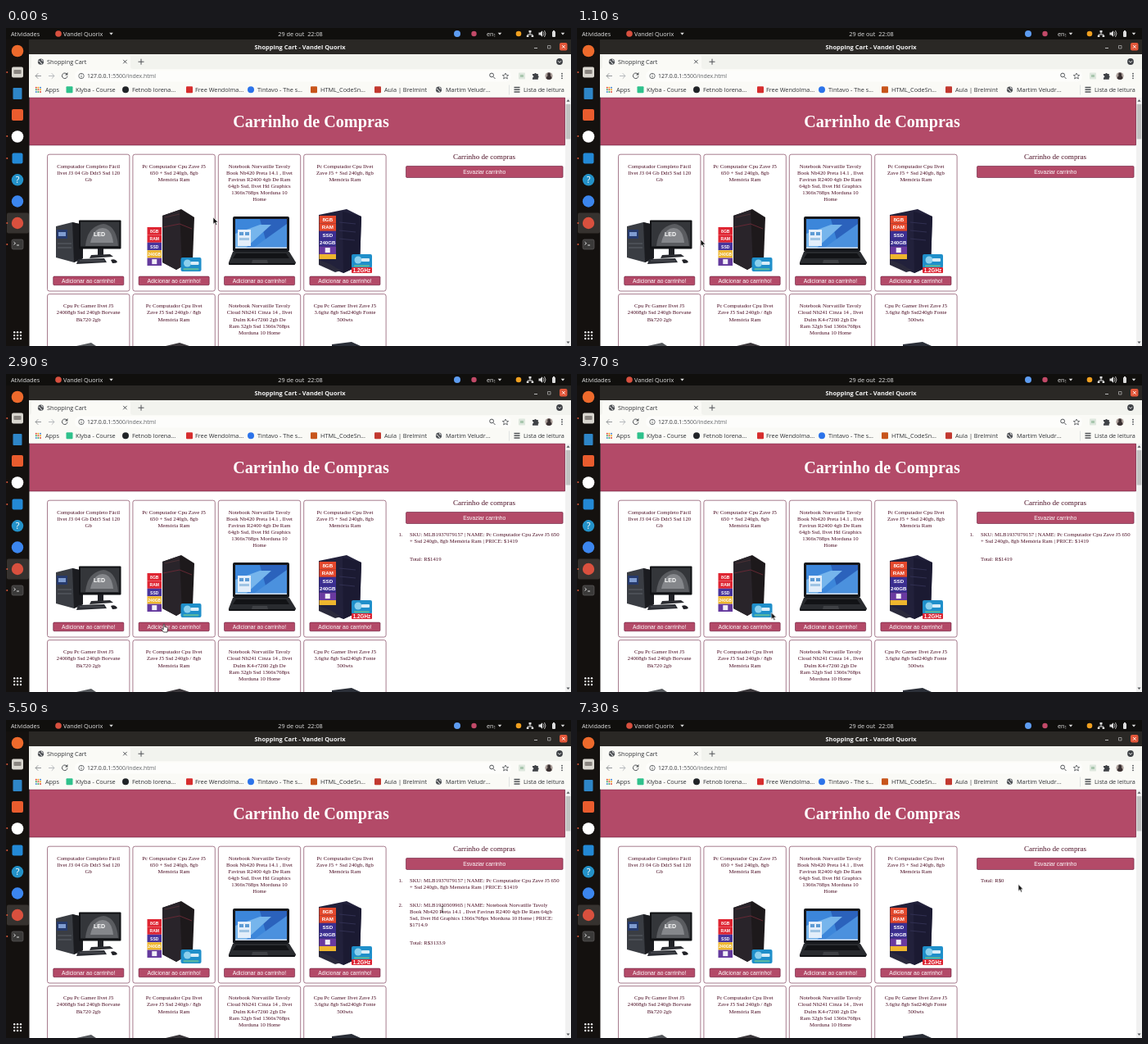
An HTML page that plays this animation: 690 px wide and 388 px high, repeating every 8000 ms.

```html
<!DOCTYPE html>
<html lang="pt-BR">
<head>
<meta charset="utf-8">
<title>Shopping Cart</title>
<style>
html, body { margin: 0; width: 100%; height: 100%; overflow: hidden; background: #fff; }
svg { display: block; width: 100vw; height: 100vh; }
text { white-space: pre; }
.ui { font: 7.3px "Open Sans", "Noto Sans", sans-serif; fill: #303236; }
.serif { font: 6.73px "Liberation Serif", serif; fill: #4a0c22; }
.button { font: 6.73px "Liberation Sans", sans-serif; fill: #fff; }
.heading { font: bold 20.2px "Liberation Serif", serif; fill: #fff; }
.badge { font: bold 5.4px "Liberation Sans", sans-serif; fill: #fff; }
.line { fill: none; }

.timed { opacity: 0; animation: 8s step-end infinite; }
.first { animation-name: first; }
.both { animation-name: both; }
.second { animation-name: second; }
.empty { animation-name: empty; }
.arrow { animation-name: arrow; }
.hand { animation-name: hand; }
.beam { animation-name: beam; }
#pointer { animation: move 8s linear infinite; }

@keyframes first { 36.25% { opacity: 1 } 58.75% { opacity: 0 } }
@keyframes both { 58.75% { opacity: 1 } 80% { opacity: 0 } }
@keyframes second { 80% { opacity: 1 } 91.25% { opacity: 0 } }
@keyframes empty { 91.25%, 100% { opacity: 1 } }
@keyframes arrow {
  0%, 40%, 60%, 91.25%, 100% { opacity: 1 }
  31.25%, 53.75%, 66.25% { opacity: 0 }
}
@keyframes hand { 31.25%, 53.75% { opacity: 1 } 40%, 60% { opacity: 0 } }
@keyframes beam { 66.25% { opacity: 1 } 91.25% { opacity: 0 } }
@keyframes move {
  0% { transform: translate(253px, 231px); animation-timing-function: steps(11) }
  13.75% { transform: translate(151px, 258px); animation-timing-function: steps(7) }
  22.5%, 28.75% { transform: translate(172px, 280px); animation-timing-function: steps(3) }
  32.5%, 37.5% { transform: translate(193px, 305px); animation-timing-function: steps(9) }
  48.75% { transform: translate(250px, 287px); animation-timing-function: steps(5) }
  55%, 58.75% { transform: translate(284.5px, 309px); animation-timing-function: steps(6) }
  66.25%, 67.5% { transform: translate(526px, 238px); animation-timing-function: steps(1) }
  68.75% { transform: translate(533px, 231px); animation-timing-function: steps(2) }
  71.25%, 72.5% { transform: translate(540px, 226px); animation-timing-function: steps(3) }
  76.25%, 100% { transform: translate(539px, 200.5px) }
}
</style>
</head>
<body>
<script>
const PINK = '#b34a68', WINE = '#5f0f30', GRAY = '#505357', PALE = '#ddd';

const rect = (x, y, w, h, fill, r = 0, more = '') =>
  `<rect x="${x}" y="${y}" width="${w}" height="${h}" rx="${r}" fill="${fill}" ${more}/>`;
const bordered = (x, y, w, h, fill, r = 0) => rect(x, y, w, h, fill, r, `stroke="${WINE}" stroke-width=".55"`);
const circle = (x, y, r, fill) => `<circle cx="${x}" cy="${y}" r="${r}" fill="${fill}"/>`;
const shape = (d, fill) => `<path d="${d}" fill="${fill}"/>`;
const line = (d, color = GRAY, width = 1) =>
  `<path class="line" d="${d}" stroke="${color}" stroke-width="${width}"/>`;
const text = (cls, x, y, str, style = '') => `<text class="${cls}" x="${x}" y="${y}" style="${style}">${str}</text>`;
const centered = (cls, x, y, str, style = '') => text(cls, x, y, str, 'text-anchor:middle;' + style);
const caret = (x, y) => shape(`M${x - 2.3} ${y - 1.3}h4.6l-2.3 2.8z`, PALE);
const globe = (x, y) => circle(x, y, 3.6, GRAY) +
  line(`M${x - 3} ${y - 1}q2 0 2.5 1.5t2 2M${x + 1} ${y - 3}q-.5 2 2 2`, '#fff', .9);
const grid = (x, y, gap, r, color) => Array.from({ length: 9 }, (_, i) =>
  circle(x + (i % 3) * gap, y + Math.floor(i / 3) * gap, r, color(i))).join('');

function topBar() {
  const pale = 'fill:#e2e2e2';
  return rect(0, 0, 690, 14, '#100f0d') +
    text('ui', 6, 9.6, 'Atividades', pale) +
    circle(64, 7, 3.8, '#d8503f') +
    text('ui', 70, 9.6, 'Vandel Quorix', pale) + caret(128.5, 7) +
    centered('ui', 359.5, 9.6, '29 de out  22:08', pale) +
    circle(551, 7, 4, '#5d9cf0') + circle(571.5, 7, 3.2, '#c24a68') +
    text('ui', 587, 9.6, 'en<tspan font-size="4.5" dy="1">1</tspan>', pale) + caret(603, 7) +
    circle(626, 7, 3.3, '#f0a020') +
    line('M640 5v3M637 10V8h6v2', PALE) + rect(638.5, 3, 3, 2.5, PALE) +
    rect(635.8, 9, 2.6, 2, PALE) + rect(641.6, 9, 2.6, 2, PALE) +
    shape('M650.5 5.5h2l2.5-2.3v7.6l-2.5-2.3h-2z', PALE) + line('M656 4.5q2 2.5 0 5M657.5 3q3 4 0 8', PALE, .8) +
    rect(667, 4, 4, 7, PALE, 1) + rect(668, 3, 2, 1, PALE) + caret(680, 7);
}

function windowBar() {
  return rect(28, 14, 662, 18.5, '#2a2825') +
    centered('ui', 359, 25.6, 'Shopping Cart - Vandel Quorix', 'font-weight:bold;font-size:7.45px;fill:#f4f4f4') +
    line('M645 24.5h4', '#bbb') + line('M661.5 21.5h3.5v3.500h-3.5z', '#bbb', .7) +
    rect(676, 18, 9.5, 9.5, '#e2573a', 2) + line('M679 21l3.6 3.6M682.6 21l-3.6 3.6', '#fff', .9);
}

function browserBars() {
  const bookmarks = [
    [73.5, 85, '#2fc18c', 'Klyba - Course', true], [142, 154, '#202327', 'Fetnob lorena...'],
    [220, 231, '#d62d2d', 'Free Wendolma...', true], [295, 307, '#2b73ea', 'Tintavo - The s...'],
    [372, 384, '#c8551b', 'HTML_CodeSn...', true], [450, 462, '#c2382f', 'Aula | Brelmint', true],
  ];
  const colors = ['#e24a3b', '#f2a51d', '#4285d8', '#3ba55c'];
  return rect(28, 32, 662, 18, '#f2f3ee') +
    shape('M28 50q3 0 3-3v-11q0-3 3-3h115q3 0 3 3v11q0 3 3 3z', '#fafaf6') +
    globe(42.5, 41.2) + text('ui', 50, 43.8, 'Shopping Cart') +
    line('M143.2 38.9l4.4 4.4M147.6 38.9l-4.4 4.4') + line('M161.5 41.2h7M165 37.7v7') +
    circle(676, 41, 3.9, '#3f4246') + line('M674 40.2l2 2 2-2', '#fff', .9) +
    rect(28, 50, 662, 34.5, '#fafaf6') + rect(84, 51.8, 533, 13.6, '#fdfdfb', 6.8) +
    line('M43 58.5h-7m3.2-3.2l-3.2 3.2 3.2 3.2', '#96999c') + line('M52 58.5h7m-3.2-3.2l3.2 3.2-3.2 3.2', '#b6b9bd') +
    line('M74.5 56.5a3.3 3.3 0 1 0 .5 2.3') + shape('M75.4 54v3.4h-3.4z', GRAY) +
    line('M95.2 58.5a3.2 3.2 0 1 0-6.4 0 3.2 3.2 0 1 0 6.4 0M92 58v2.4M92 56.2v.9', GRAY, .8) +
    text('ui', 99, 61, '127.0.0.1<tspan fill="#5f6266">:5500/index.html</tspan>', 'font-size:6.95px') +
    line('M595.5 57.5a2.4 2.4 0 1 0-4.8 0 2.4 2.4 0 1 0 4.8 0M595 59.5l2.5 2.5') +
    line('M610 55l1.1 2.4 2.6.2-2 1.8.7 2.6-2.4-1.4-2.4 1.4.7-2.6-2-1.8 2.6-.2z', GRAY, .8) +
    rect(626, 54.5, 8, 8, '#dde7dd', 1) + rect(628, 57, 4, 3, '#a9c7ae') +
    shape('M643 56h2.2a1.4 1.4 0 0 1 2.6 0h2v2.2a1.4 1.4 0 0 1 0 2.6v2h-6.8v-2.2a1.3 1.3 0 0 0 0-2.6z', '#3f4246') +
    circle(663, 58.5, 4.6, '#a99d98') + shape('M659.5 61.5q1-3 2-3-1-4 1.5-4t2 4q1 0 1.6 3-3.5 3-7.1 0z', '#3a3031') +
    [55.7, 58.5, 61.3].map(y => circle(679, y, .9, GRAY)).join('') +
    grid(36.8, 72.7, 2.6, 1, i => colors[i % 4]) +
    text('ui', 48, 78, 'Apps') +
    bookmarks.map(([x, tx, color, label, square]) =>
      (square ? rect(x, 71.3, 8, 8, color, 1) : circle(x + 4, 75.3, 4, color)) + text('ui', tx, 78, label)).join('') +
    globe(528.5, 75.2) + text('ui', 537, 78, 'Martim Veludr...') +
    rect(614, 69.5, .7, 12, '#d5d7da') +
    line('M620.5 72.5h7M620.5 75.3h7M620.5 78h7', GRAY, 1.4) +
    text('ui', 632, 78, 'Lista de leitura');
}

function sidebar() {
  const running = [54, 132, 159, 238, 264];
  return rect(0, 14, 28.5, 374, '#14110f') + rect(1, 225.5, 27, 25, '#36322f', 2) +
    running.map(y => circle(1.3, y, 1, '#d8573a')).join('') +
    circle(14, 28, 7.3, '#ee6a2c') +
    rect(7, 47.5, 14, 13, '#d9d6cf', 2) + rect(9.5, 51, 9, 5, '#8a8580', 1) +
    rect(8.5, 73, 11, 14, '#2e86c8', 1) + rect(7, 99, 14, 14, '#e95c2e', 2) +
    circle(14, 132.5, 7.3, '#fff') + rect(7.5, 152.5, 13, 13, '#2389d6', 2) +
    circle(14, 185.3, 7.2, '#2492c9') +
    centered('ui', 14, 189.2, '?', 'font-size:11px;fill:#fff') +
    circle(14, 211.5, 7.2, '#3c86ee') + circle(14, 238, 7.2, '#d9503e') +
    rect(7, 258, 14, 12, '#3b3a39', 2, 'stroke="#666462" stroke-width=".6"') +
    line('M9.5 261l2 1.7-2 1.7M13 265h3', '#eee', .9) +
    grid(10.2, 371.2, 3.9, 1.2, () => '#eee');
}

const sticker = (x, y) => rect(x, y, 25, 17, '#1f8fca', 2) + circle(x + 8, y + 7, 4.5, '#8bd0ee') +
  rect(x + 12, y + 5, 10, 4, '#d9edf8', 1) + rect(x + 3, y + 13, 19, 2.5, '#54b4a4', 1);

function desktopSet() {
  return shape('M61 242l20-5 13 3v41l-11 5-22-6z', '#3a3d43') + shape('M81 237l13 3v41l-11 5z', '#1b1c20') +
    rect(62, 246, 13, 11, '#263a6c') + rect(64, 249, 9, 5, '#7f9cd0') + line('M63 263h17M63 268h17', '#666a72', .8) +
    rect(89, 234.5, 51.5, 35, '#111215', 1) + rect(91, 236.5, 47.5, 30, '#34363a') +
    shape('M97 266q2-24 22-27 16 2 18 27z', '#5a5c60') + shape('M103 262q4-18 15-18t13 18z', '#85878b') +
    centered('badge', 114, 254, 'LED', 'font-size:7px') +
    rect(112, 269, 7, 8, '#202126') + shape('M104 277l23-1 4 3-29 2z', '#2b2c31') +
    shape('M88 282l32-1 3 5-37 2z', '#2b2d33') + line('M90 284h30', '#65686e', .8) +
    shape('M128 283q4-2 7 1t-5 3z', '#202126');
}

function badges(x, y, width, height, labels, fills, size) {
  return fills.map((fill, i) => rect(x, y + i * height, width, height, fill) +
    (labels[i] ? centered('badge', x + width / 2, y + i * height + height * .72, labels[i], `font-size:${size}px`) : '')).join('') +
    rect(x + width / 2 - 3, y + 4 * height + 1.5, 6, 6, '#f1eef7');
}

function redTower() {
  return shape('M191 229l23-8 16 10-2 52-20 12-17-9z', '#1d191b') + shape('M191 229l21-7 3 69-7 4-17-9z', '#29242a') +
    line('M192 243l20-4 15 6', '#6d2a36', .9) + line('M194 231l18-4', '#4b3035') +
    badges(172.5, 243, 17.5, 9.4, ['8GB', 'RAM', 'SSD', '240GB'],
      ['#df2532', '#df2532', '#48349c', '#eeb62e', '#653a9e'], 5) +
    sticker(213.5, 280);
}

function laptop() {
  return rect(277, 230, 69, 43, '#16181c', 2) + rect(280, 233, 63, 36, '#2b62bc') +
    shape('M280 233h30l10 36h-40z', '#3c86da') + shape('M280 251l30-11 14 0-32 29h-12z', '#76b5ec') +
    shape('M343 239v30h-42z', '#4b91de') +
    rect(283, 246, 16, 20, '#e3eefa') + rect(285, 249, 5, 4, '#5d9bd4') + rect(292, 249, 5, 4, '#5d9bd4') +
    rect(285, 256, 12, 3, '#9fc4e4') + rect(280, 267.5, 63, 1.5, '#d8e2ef') +
    shape('M277 273h69l8 13q0 3-4 3h-75q-4 0-3-3z', '#292b2f') + shape('M281 275h61l4 6h-69z', '#121316') +
    shape('M301 283h18l1 4h-20z', '#3f4145') + rect(272, 287, 81, 2, '#111215', 1);
}

function navyTower() {
  return shape('M382 228l34-7 18 9-2 60-20 9-30-12z', '#22213b') + shape('M411 224l23 6-2 60-20 9z', '#1b1a32') +
    line('M407 237l20 2M407 247l20 2M407 257l19 2', '#37355a', .8) +
    badges(382.5, 229, 20.5, 9.4, ['8GB', 'RAM', 'SSD', '240GB'],
      ['#e4482c', '#e4482c', '#3c2f92', '#3c2f92', '#6a3aa0'], 6.2) +
    rect(382.5, 276, 20.5, 6, '#eeb62e') + shape('M382 283l14 5 13 8-7 2-20-9z', '#2b2a3c') +
    sticker(422, 276) + rect(422, 292, 25, 7, '#dc2433', 1) + centered('badge', 434.5, 297.5, '1.2GHz', 'font-size:6.3px');
}

const titles = [
  ['Computador Completo Fácil', 'Ilvet J3 04 Gb Ddr3 Ssd 120', 'Gb'],
  ['Pc Computador Cpu Zave J5', '650 + Ssd 240gb, 8gb', 'Memória Ram'],
  ['Notebook Norvatille Tavoly', 'Book Nb420 Preta 14.1 , Ilvet', 'Favirun R2400 4gb De Ram', '64gb Ssd, Ilvet Hd Graphics', '1366x768px Morduna 10', 'Home'],
  ['Pc Computador Cpu Ilvet', 'Zave J5 + Ssd 240gb, 8gb', 'Memória Ram'],
  ['Cpu Pc Gamer Ilvet J5', '24008gb Ssd 240gb Borvane', 'Bk720 2gb'],
  ['Pc Computador Cpu Ilvet', 'Zave J5 Ssd 240gb / 8gb', 'Memória Ram'],
  ['Notebook Norvatille Tavoly', 'Cloud Nb241 Cinza 14 , Ilvet', 'Dulm K4-r7260 2gb De', 'Ram 32gb Ssd 1366x768px', 'Morduna 10 Home'],
  ['Cpu Pc Gamer Ilvet Zave J5', '3.6ghz 8gb Ssd240gb Fonte', '500wts'],
];

function card(lines, i) {
  const x = 50.5 + (i % 4) * 104.4, y = 154.2 + Math.floor(i / 4) * 170.4, mid = x + 50.2;
  return bordered(x, y, 100.4, 166.8, '#fff', 2.5) +
    lines.map((s, row) => centered('serif', mid, y + 16.8 + row * 8.05, s)).join('') +
    bordered(x + 7.2, y + 148.9, 86.1, 10.6, PINK, 1.2) +
    centered('button', mid, y + 156.7, 'Adicionar ao carrinho!');
}

function page() {
  return bordered(28.7, 84.9, 654, 58.1, PINK) +
    centered('heading', 372.5, 121, 'Carrinho de Compras') +
    titles.map(card).join('') + desktopSet() + redTower() + laptop() + navyTower() +
    shape('M86 388l18-4 6 4z', '#55585c') + shape('M195 388l17-4 12 4z', '#3a363a') +
    shape('M398 388v-2l24-3 11 5z', '#2b2f38') +
    centered('serif', 584, 160, 'Carrinho de compras', 'font-size:9.09px') +
    bordered(488.5, 168.5, 191.6, 14, PINK, 1.2) + centered('button', 584.2, 178, 'Esvaziar carrinho') +
    rect(683, 84.5, 7, 303.5, '#f1f1f1') + rect(683.7, 93, 5.6, 42.5, '#c1c1c1') +
    shape('M684.5 89.8h4l-2-2.5z', GRAY) + shape('M684.5 382.5h4l-2 2.5z', GRAY);
}

const tower = ['SKU: MLB1937079157 | NAME: Pc Computador Cpu Zave J5 650', '+ Ssd 240gb, 8gb Memória Ram | PRICE: $1419'];
const notebook = ['SKU: MLB1930509965 | NAME: Notebook Norvatille Tavoly', 'Book Nb420 Preta 14.1 , Ilvet Favirun R2400 4gb De Ram 64gb',
  'Ssd, Ilvet Hd Graphics 1366x768px Morduna 10 Home | PRICE:', '$1714.9'];

function cart(name, items, total) {
  let y = 197.6, out = '';
  items.forEach((lines, i) => {
    out += text('serif', 479.5, y, `${i + 1}.`);
    lines.forEach((s, row) => out += text('serif', 493, y + row * 8.05, s));
    y += lines.length * 8.05 + 13.8;
  });
  return `<g class="timed ${name}">${out}${text('serif', 493, y, 'Total: R$' + total)}</g>`;
}

function pointer() {
  const edged = (name, d, fill, edge) =>
    `<path class="timed ${name}" d="${d}" fill="${fill}" stroke="${edge}" stroke-width=".7"/>`;
  return '<g id="pointer">' +
    edged('arrow', 'M0 0v8.3l1.9-1.7 1.4 2.9 1.4-.7-1.4-2.8h2.6z', '#111', '#eee') +
    edged('hand', 'M-.8 .5q.8-1 1.6 0v3l3 .7q1 .3.8 1.5l-.6 4.3h-4.5l-3-3.7q.3-1.2 1.5-.4l1.2.9z', '#fff', '#111') +
    edged('beam', 'M-1.5-4q1.5 0 1.5 1v6q0 1-1.5 1M1.5-4q-1.5 0-1.5 1M0 3q0 1 1.5 1', 'none', '#222') + '</g>';
}

document.body.innerHTML = '<svg viewBox="0 0 690 388" preserveAspectRatio="none">' +
  rect(0, 0, 690, 388, '#fff') + page() +
  cart('first', [tower], '1419') + cart('both', [tower, notebook], '3133.9') +
  cart('second', [notebook], '1714.9') + cart('empty', [], '0') +
  sidebar() + topBar() + windowBar() + browserBars() + pointer() + '</svg>';
</script>
</body>
</html>
```
